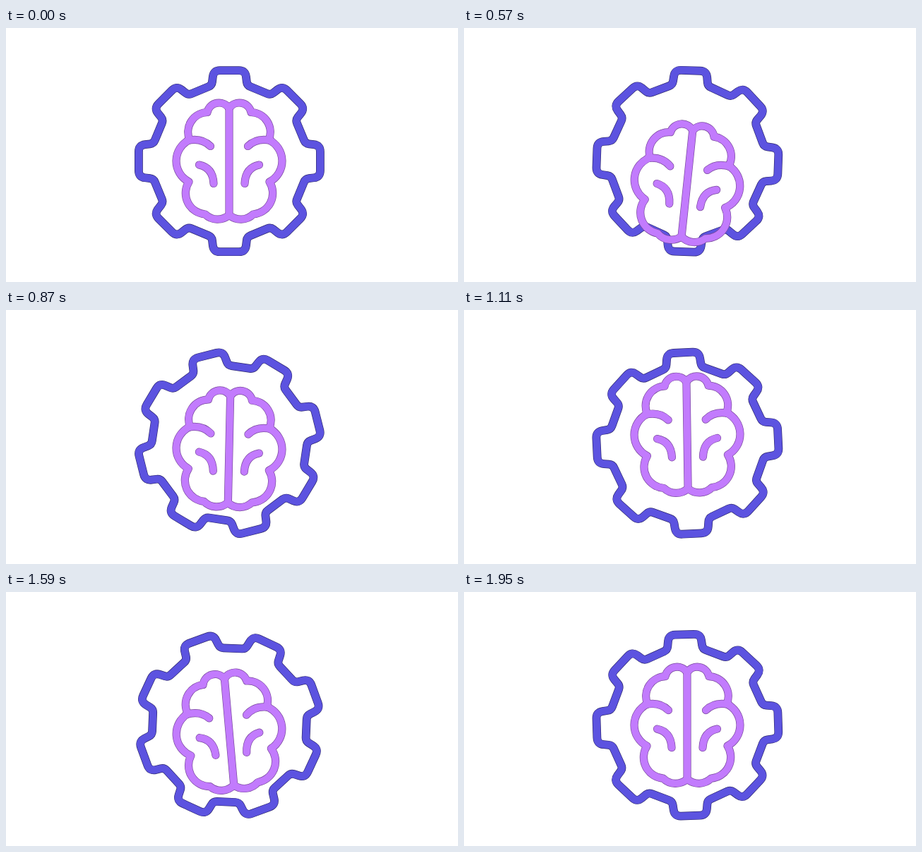
These frames come from a looping animation (640x360 px, 1.98 s). An HTML page:

```html
<!DOCTYPE html>
<html lang="en">
<head>
<meta charset="utf-8">
<title>Brain gear</title>
<style>
  html, body { margin: 0; width: 100%; height: 100%; overflow: hidden; background: #fff; }
  svg { display: block; width: 100vw; height: 100vh; }
  path, use { fill: none; stroke-linecap: round; stroke-linejoin: round; }
  .gear { stroke: #5c53e0; stroke-width: 10.4; }
  .gear.edge { stroke: #2f2972; stroke-width: 11.8; }
  .brain { stroke: #c27bfd; stroke-width: 9.8; }
  .brain.edge { stroke: #7a4a9e; stroke-width: 11.2; }
  .spark { stroke: #c27bfd; stroke-width: 8.8; }
  .spark.edge { stroke: #7a4a9e; stroke-width: 10.2; }
</style>
</head>
<body>
<svg viewBox="0 0 640 360">
  <defs>
    <path id="ring"/>
    <g id="half">
      <path d="M316 114 A17 17 0 0 0 285 119.5 A28 28 0 0 0 260 158.5
               A33.2 33.2 0 0 0 259 218 A30 30 0 0 0 282 264 A25 25 0 0 0 316 265"/>
      <path d="M257 159.500 Q277 155 289.500 167.500"/>
      <path d="M273.500 194 Q293 198 294 220.500"/>
    </g>
    <g id="lobes">
      <use href="#half"/>
      <use href="#half" transform="translate(632 0) scale(-1 1)"/>
      <path d="M316 114 V265"/>
    </g>
    <g id="rays">
      <path pathLength="1" d="M400 49.500 L396.500 33"/>
      <path pathLength="1" d="M431 58.500 L439 43.500"/>
      <path pathLength="1" d="M446 86.500 L464 84.800"/>
    </g>
  </defs>
  <g id="gear">
    <use href="#ring" class="gear edge"/>
    <use href="#ring" class="gear"/>
  </g>
  <g id="brain">
    <use href="#lobes" class="brain edge"/>
    <use href="#lobes" class="brain"/>
  </g>
  <g id="sparks">
    <use href="#rays" class="spark edge"/>
    <use href="#rays" class="spark"/>
  </g>
</svg>
<script>
const LOOP = 1980, STEP = 30, TEETH = 8;
const $ = id => document.getElementById(id);
const clamp = v => Math.min(1, Math.max(0, v));

// Turning points of the brain: [ms, value]
const drop = [[0, 0], [570, 31], [1150, -12.5], [1600, 9], [LOOP, 0]];
const tilt = [[0, 0], [300, -14.2], [570, 6], [1000, 0], [1455, -6], [LOOP, 0]];
const bursts = [210, 1365];

// Cosine swing from one turning point to the next
function swing(keys, t) {
  const i = keys.findIndex(k => k[0] > t);
  const [t0, v0] = keys[i - 1], [t1, v1] = keys[i];
  return v0 + (v1 - v0) * (1 - Math.cos(Math.PI * (t - t0) / (t1 - t0))) / 2;
}

// Cubic Bezier easing, solved by bisection
function ease(u, x1, y1, x2, y2) {
  const curve = (s, a, b) => 3 * a * s * (1 - s) ** 2 + 3 * b * s * s * (1 - s) + s ** 3;
  let lo = 0, hi = 1;
  for (let i = 0; i < 24; i++) {
    const mid = (lo + hi) / 2;
    if (curve(mid, x1, x2) < u) lo = mid; else hi = mid;
  }
  return curve(lo, y1, y2);
}

const spin = t => 313.5 * ease(t / LOOP, 0.39, 0.22, 0.52, 0.97);

function gearPath() {
  const pts = [];
  const add = (x, y, r, a) => pts.push({
    x: x * Math.cos(a) - y * Math.sin(a),
    y: x * Math.sin(a) + y * Math.cos(a),
    r
  });
  for (let k = 0; k < TEETH; k++) {
    const a = k * 2 * Math.PI / TEETH;
    add(-25, -107.5, 5, a);
    add(-22.5, -128.5, 9, a);
    add(22.5, -128.5, 9, a);
    add(25, -107.5, 5, a);
  }
  const toward = (p, q) => {
    const f = p.r / Math.hypot(q.x - p.x, q.y - p.y);
    return [p.x + (q.x - p.x) * f, p.y + (q.y - p.y) * f];
  };
  const n = pts.length;
  return pts.map((p, i) => {
    const from = toward(p, pts[(i + n - 1) % n]), to = toward(p, pts[(i + 1) % n]);
    return `${i ? 'L' : 'M'}${from} Q${p.x},${p.y} ${to}`;
  }).join(' ') + 'Z';
}

// Each ray shoots outwards, then vanishes from its inner end
function drawSparks(t) {
  const start = bursts.find(b => t > b && t < b + 180);
  $('sparks').style.display = start === undefined ? 'none' : '';
  if (start === undefined) return;
  const head = clamp((t - start) / 60), tail = clamp((t - start - 120) / 60);
  for (const ray of $('rays').children) {
    ray.setAttribute('stroke-dasharray', `${head - tail} 2`);
    ray.setAttribute('stroke-dashoffset', -tail);
  }
}

const begin = performance.now();

function draw() {
  const t = Math.floor((performance.now() - begin) % LOOP / STEP) * STEP;
  $('gear').setAttribute('transform', `translate(316.4 188.7) rotate(${spin(t)})`);
  $('brain').setAttribute('transform', `translate(0 ${swing(drop, t)}) rotate(${swing(tilt, t)} 316 188.5)`);
  drawSparks(t);
  requestAnimationFrame(draw);
}

$('ring').setAttribute('d', gearPath());
draw();
</script>
</body>
</html>
```
